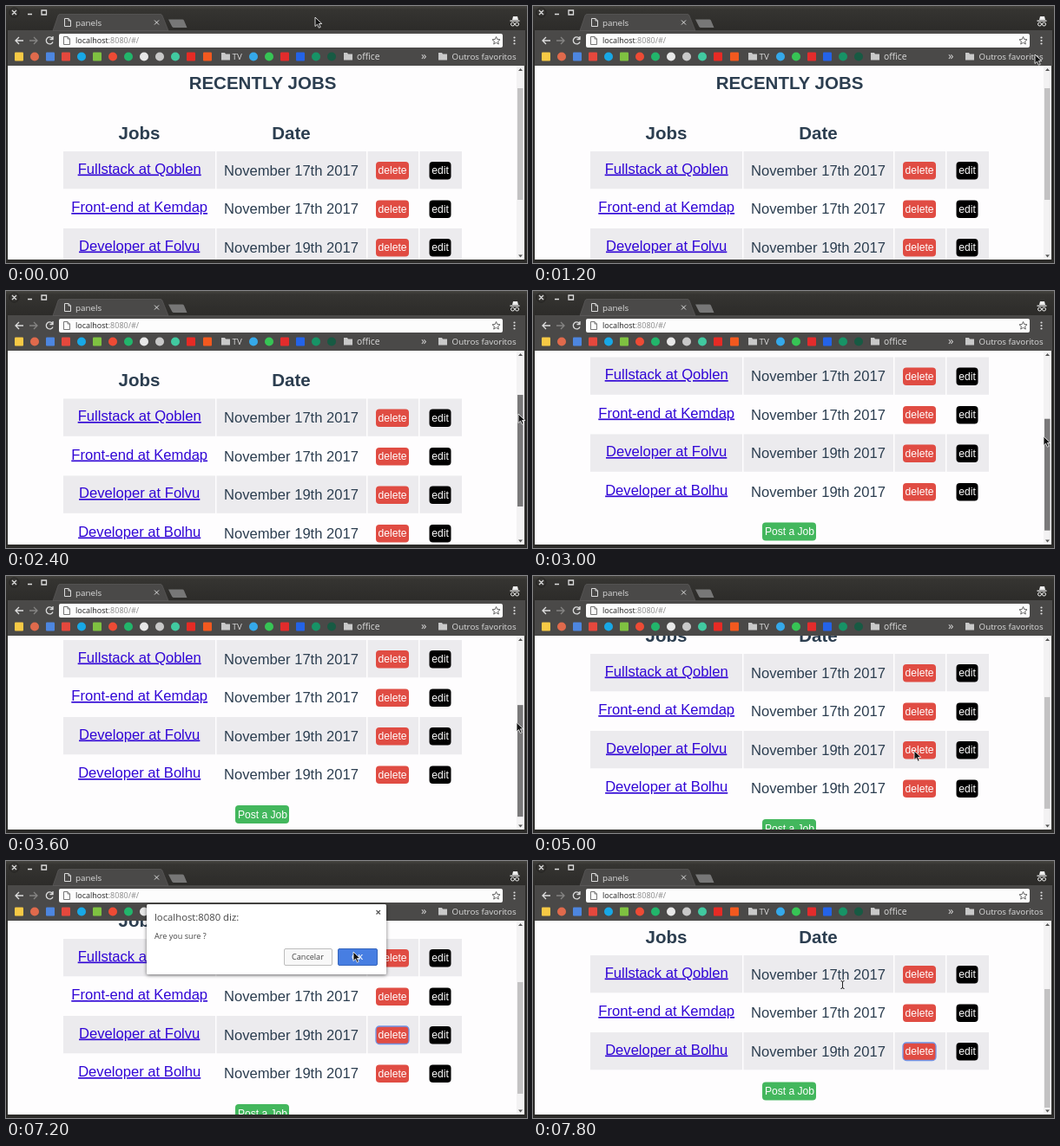
Write an HTML page that moves like this. It is 600 by 297 pixels and loops after 8000 ms.

```html
<!DOCTYPE html>
<html lang="en">
<head>
<meta charset="utf-8">
<title>panels</title>
<style>
  html, body { margin: 0; width: 100%; height: 100%; overflow: hidden; background: #fff; }
  svg { display: block; width: 600px; height: 297px; }
  text { white-space: pre; }
  .ui { font-family: "Open Sans", "Noto Sans", sans-serif; font-size: 9.8px; fill: #ddd; }
  .page { font-family: "Liberation Sans", Arial, sans-serif; font-size: 16.6px; fill: #2c3e50; text-anchor: middle; }
  .head { font-size: 20.5px; font-weight: bold; }
  .link { fill: #3005d6; text-decoration: underline; }
  .label { font-size: 12.1px; fill: #fff; }
  .line { fill: none; stroke: #ddd; stroke-width: 1.3; }
  #dialog { filter: drop-shadow(0 1px 2px #0008); }
  #dialog text { fill: #444; font-size: 9.1px; }
</style>
</head>
<body>
<svg viewBox="0 0 600 297">
  <defs>
    <linearGradient id="bar" x2="0" y2="1">
      <stop stop-color="#45443f"/><stop offset=".15" stop-color="#353431"/><stop offset="1" stop-color="#2c2b29"/>
    </linearGradient>
    <clipPath id="view"><path d="M2 69H588V293H2z"/></clipPath>
    <path id="folder" d="M0 1h4l1 1.5h5v7H0z" fill="#c9c9c9"/>
    <path id="sheet" d="M.5.5h4.500l2.500 2.500v6.500h-7zM5 .5v2.500h2.500"/>
  </defs>

  <rect width="600" height="297" fill="#2b2a28"/>
  <rect width="600" height="29" fill="url(#bar)"/>
  <rect x="2" y="28" width="596" height="41" fill="#4a4948"/>
  <path d="M54 28.500L60 11q.6-1.500 2-1.500H178q1.500 0 2 1.500L187 28.500z" fill="#4a4948" stroke="#626160" stroke-width=".6"/>
  <path d="M187 15.500h16q1.500 0 2 1.200l3.500 8.300h-15q-1.700 0-2.300-1.200z" fill="#777"/>
  <path class="line" d="M7 5l5 5m0-5l-5 5M25 9.500h5M41 5h5.500v5H41z"/>
  <circle class="line" cx="9.500" cy="7.500" r="5.500" style="stroke:#1d1c1a;stroke-width:.7"/>
  <use href="#sheet" x="67" y="14" class="line" style="stroke-width:1"/>
  <text class="ui" x="80" y="22.500">panels</text>
  <path class="line" d="M171 16.500l5 5m0-5l-5 5" style="stroke-width:1"/>
  <g fill="#eee"><path d="M583 16l1-4h5l1 4zM580.500 16.500h11v1.200h-11z"/>
    <g class="line" style="stroke:#eee;stroke-width:1"><circle cx="583.5" cy="21" r="2"/><circle cx="588.5" cy="21" r="2"/></g></g>

  <path class="line" d="M20 40h-9m4-4l-4 4 4 4"/>
  <path class="line" d="M27 40h9m-4-4l4 4-4 4" style="stroke:#858483"/>
  <path class="line" d="M53.500 37.500a4 4 0 1 0 .5 4M54 35v3.500h-3.500"/>
  <rect x="61" y="32" width="511" height="16" rx="2" fill="#fdfdfd"/>
  <use href="#sheet" x="66" y="35" fill="none" stroke="#666" stroke-width=".9"/>
  <text class="ui" x="80" y="43.300" style="font-size:9px;fill:#222">localhost<tspan fill="#888">:8080/#/</tspan></text>
  <path d="M564.500 35.500l1.300 3 3.200.3-2.400 2.100.7 3.200-2.800-1.700-2.800 1.700.7-3.200-2.400-2.100 3.200-.3z" fill="none" stroke="#555" stroke-width=".9"/>
  <g fill="#ddd"><circle cx="585.500" cy="36.500" r="1.100"/><circle cx="585.500" cy="40" r="1.100"/><circle cx="585.500" cy="43.500" r="1.100"/></g>

  <g id="marks"></g>
  <use href="#folder" x="248" y="53"/><text class="ui" x="260.500" y="62">TV</text>
  <use href="#folder" x="389" y="53"/><text class="ui" x="404" y="62" style="font-size:10.300px">office</text>
  <text class="ui" x="478" y="62" style="font-size:13px">»</text>
  <use href="#folder" x="498" y="53"/><text class="ui" x="513.500" y="62">Outros favoritos</text>

  <rect x="2" y="69" width="595" height="224" fill="#fefdfe"/>
  <g clip-path="url(#view)">
    <g id="page" class="page">
      <text class="head" x="295.500" y="96">RECENTLY JOBS</text>
      <text class="head" x="153.500" y="153.500">Jobs</text>
      <text class="head" x="328.500" y="153.500">Date</text>
      <g id="rows"></g>
      <g id="post">
        <rect x="264" y="359" width="62" height="21" rx="4" fill="#43b75d"/>
        <text class="label" x="295.500" y="373.500">Post a Job</text>
      </g>
    </g>
  </g>
  <rect x="588" y="69" width="9" height="224" fill="#f3f2f3"/>
  <path d="M590 75l2.500-3 2.500 3zM590 287.500l2.500 3 2.500-3z" fill="#555"/>
  <rect id="thumb" x="589" width="6.500"/>

  <g id="dialog" class="ui">
    <rect x="162" y="50" width="276" height="81" rx="1.500" fill="#fff"/>
    <text x="171" y="69" style="font-size:11.300px">localhost:8080 diz:</text>
    <path d="M426.500 57l4.500 4.500m0-4.500l-4.500 4.500" stroke="#555" stroke-width="1.200"/>
    <text x="171" y="89.500">Are you sure ?</text>
    <rect x="320.500" y="101.500" width="55" height="19" rx="1.500" fill="#f8f8f8" stroke="#bdbdbd"/>
    <text x="329" y="114.300">Cancelar</text>
    <rect x="382.500" y="101.500" width="45" height="19" rx="1.500" fill="#477ee2" stroke="#3565bd"/>
    <text x="398" y="114.300" style="fill:#fff;font-weight:600">OK</text>
  </g>

  <path id="arrow" d="M0 0v10.500l2.500-2.300 1.800 4 1.900-.8-1.800-3.900h3.400z" fill="#111" stroke="#fff" stroke-width=".8"/>
  <path id="beam" d="M-2-4.500q2 0 2 1.500v6q0 1.500-2 1.500M2-4.500q-2 0-2 1.500M2 4.500q-2 0-2-1.500" fill="none" stroke="#222"/>
</svg>
<script>
const $ = id => document.getElementById(id);
const show = (id, on) => $(id).style.display = on ? "" : "none";
const move = (id, x, y) => $(id).setAttribute("transform", `translate(${x} ${y})`);

const LOOP = 8000, STEP = 200, ROW = 44.5;
const OPENED = 5400, DELETED = 7400;

// x, colour and corner radius of each bookmark
const marks = [
  [15, "#f6c945", 1], [33, "#e06a4c", 5], [51, "#4d86e0", 1], [69, "#e5483d", 1], [87, "#18a8e6", 5],
  [105, "#7fc241", 1], [123, "#ee4b35", 5], [141, "#22b56b", 5], [159, "#e8e8e8", 5], [177, "#c8c8c8", 5],
  [195, "#41c9a0", 5], [213, "#e62b25", 1], [232, "#f2591f", 1], [285, "#35a9ea", 5], [303, "#37c455", 5],
  [321, "#e32c2c", 1], [339, "#2463e8", 1], [357, "#179366", 5], [375, "#175a43", 5]
];
$("marks").innerHTML = marks.map(([x, color, r]) =>
  `<rect x="${x - 5}" y="53.500" width="10" height="10" rx="${r}" fill="${color}"/>`).join("");

const jobs = [
  ["Fullstack at Qoblen", 17], ["Front-end at Kemdap", 17],
  ["Developer at Folvu", 19], ["Developer at Bolhu", 19]
];
const cells = [[66, 175], [242.5, 172.5], [416.5, 58.5], [476.5, 48.5]];

function button(x, width, color, label, focused) {
  const ring = focused ? 'stroke="#7095e8" stroke-width="1.300"' : "";
  return `<rect x="${x}" y="12" width="${width}" height="20.500" rx="4" fill="${color}" ${ring}/>
    <text class="label" x="${x + width / 2}" y="26">${label}</text>`;
}

function row([title, day], i, focused) {
  const shade = i % 2 ? "" : cells.map(([x, w]) =>
    `<rect x="${x}" width="${w}" height="43.300" fill="#ecebee"/>`).join("");
  return `<g transform="translate(0 ${168 + i * ROW})">${shade}
    <text class="link" x="153.700" y="25.500">${title}</text>
    <text x="328.500" y="27.700">November ${day}th 2017</text>
    ${button(426, 38, "#e04c43", "delete", focused)}${button(487.5, 25, "#000", "edit")}</g>`;
}

function along(track, t) {
  const next = track.findIndex(key => key[0] > t);
  if (next < 0) return track.at(-1).slice(1);
  const [a, b] = [track[next - 1], track[next]];
  const k = (t - a[0]) / (b[0] - a[0]);
  return a.slice(1).map((v, i) => v + (b[i + 1] - v) * k);
}

// time, then position
const pointer = [
  [0, 356, 13], [200, 356, 13], [1200, 578, 56], [1600, 591, 117], [1800, 591, 117], [2000, 591, 121],
  [2400, 590, 142], [3000, 588, 168], [3400, 588, 174], [4000, 588, 160], [4600, 439, 202],
  [6000, 439, 202], [7000, 400, 105], [7400, 400, 105], [7800, 356.5, 143]
];
const scroll = [
  [0, 0], [1800, 0], [2000, 7.5], [2400, 43.5], [3000, 91.5], [3400, 102], [4000, 78], [7399, 78], [7400, 59]
];

let rowState = "";

function draw(now) {
  const t = Math.floor(now % LOOP / STEP) * STEP;
  const deleted = t >= DELETED, focused = t >= OPENED;
  const [x, y] = along(pointer, t), [offset] = along(scroll, t);

  const state = `${deleted} ${focused}`;
  if (state !== rowState) {
    rowState = state;
    $("rows").innerHTML = jobs.filter((_, i) => !(deleted && i === 2))
      .map((job, i) => row(job, i, focused && i === 2)).join("");
  }
  move("page", 0, -offset);
  move("post", 0, deleted ? -ROW : 0);

  const thumb = $("thumb"), dragging = t >= 1800 && t < 4200;
  thumb.setAttribute("y", deleted ? 148 : 95 + offset * .576);
  thumb.setAttribute("height", deleted ? 137 : 129);
  thumb.setAttribute("fill", dragging ? "#7a797a" : "#c3c2c3");

  show("dialog", focused && !deleted);
  const overText = t >= 7600;
  show("arrow", !overText);
  show("beam", overText);
  move(overText ? "beam" : "arrow", x, y);
}

function tick() {
  draw(performance.now());
  requestAnimationFrame(tick);
}
tick();
</script>
</body>
</html>
```
